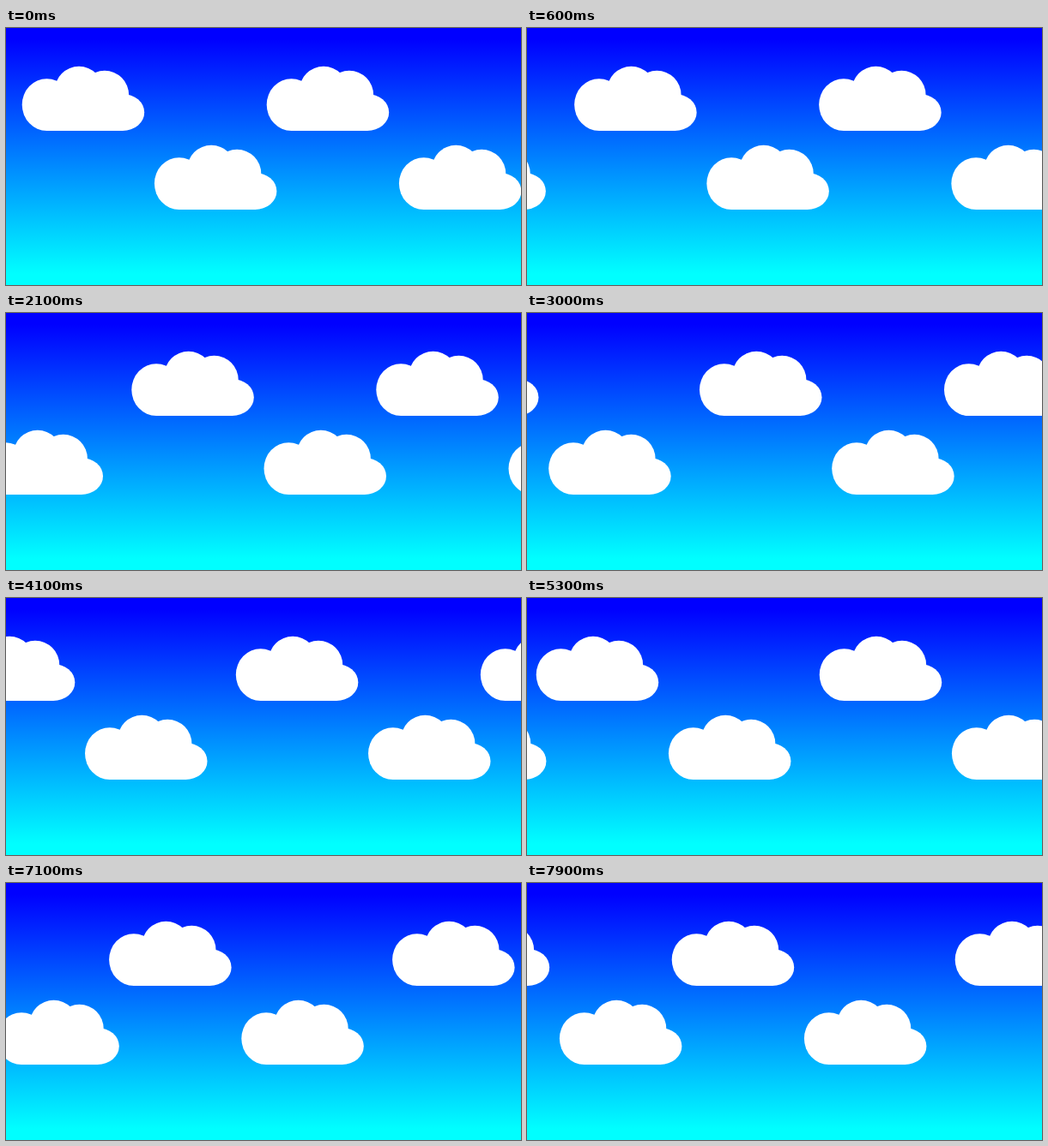
These frames come from a looping animation (600 by 300 pixels, 8000 ms). An HTML page:

```html
<!DOCTYPE html>
<html lang="en">
<head>
<meta charset="utf-8">
<title>Drifting clouds</title>
<style>
  html, body { margin: 0; width: 100%; height: 100%; overflow: hidden; background: #00f; }
  svg { display: block; width: 100%; height: 100%; }
</style>
</head>
<body>
<svg viewBox="0 0 600 300">
  <defs>
    <linearGradient id="sky" gradientUnits="userSpaceOnUse" x1="0" y1="13" x2="0" y2="287">
      <stop offset="0" stop-color="#00f"/>
      <stop offset="1" stop-color="#0ff"/>
    </linearGradient>
    <g id="cloud" fill="#fff">
      <ellipse cx="28.8" cy="44.6" rx="28.8" ry="30.4"/>
      <circle cx="66.3" cy="28" r="28.2"/>
      <circle cx="96.2" cy="33" r="28.2"/>
      <ellipse cx="117.3" cy="53.5" rx="25.2" ry="21.5"/>
      <rect x="28.8" y="36" width="88.5" height="39"/>
    </g>
  </defs>
  <rect width="600" height="300" fill="url(#sky)"/>
  <g id="clouds"></g>
</svg>
<script>
  const LOOP = 8000;
  const STEP = 100;
  const SPEED = 6.076;      // pixels per step
  const WRAP = 615;         // distance after which a cloud re-enters
  const CLOUD_WIDTH = 143;

  const layer = document.getElementById('clouds');
  const clouds = [[18.7, 45], [303.7, 45], [172.9, 137], [457.9, 137]].flatMap(([x, y]) =>
    [0, -WRAP].map(shift => {
      const node = document.createElementNS('http://www.w3.org/2000/svg', 'use');
      node.setAttribute('href', '#cloud');
      layer.append(node);
      return { node, x: x + shift, y };
    }));

  function draw(time) {
    const drift = Math.floor((time % LOOP) / STEP) * SPEED;
    for (const { node, x, y } of clouds) {
      const left = x + drift;
      node.setAttribute('transform', `translate(${left.toFixed(2)} ${y})`);
      node.style.display = left > -CLOUD_WIDTH && left < 600 ? '' : 'none';
    }
  }

  const start = performance.now();
  function tick() {
    draw(performance.now() - start);
    requestAnimationFrame(tick);
  }
  tick();
</script>
</body>
</html>
```
